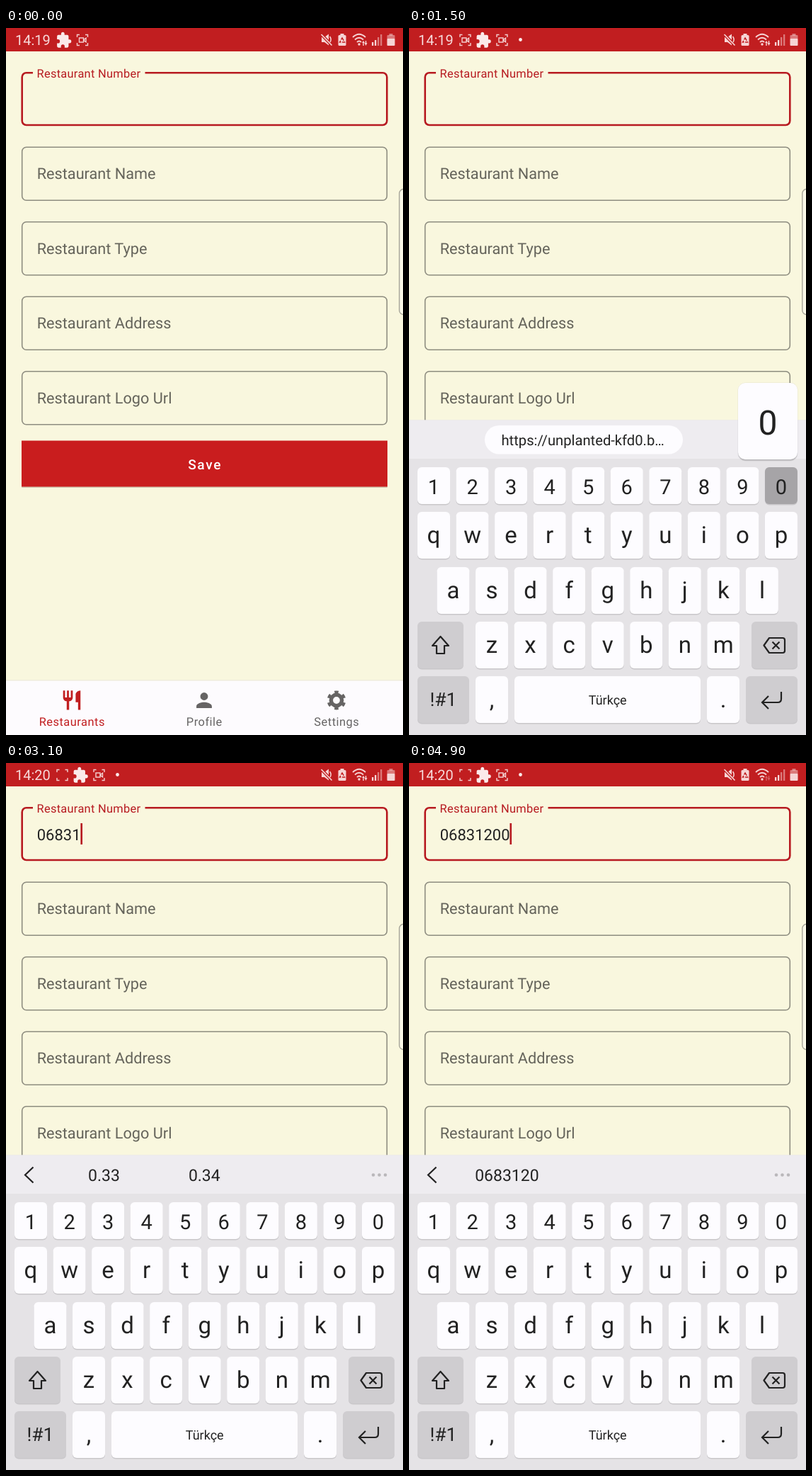
Animation, 561 px wide and 998 px high, one loop 5 s. Source, as an HTML page:

```html
<!DOCTYPE html>
<html lang="en">
<head>
<meta charset="utf-8">
<title>Restaurant form</title>
<style>
html, body { margin: 0; width: 100%; height: 100%; overflow: hidden; background: #f9f7de; }
svg { display: block; width: 100%; height: 100%; font-family: Roboto, Inter, sans-serif; text-rendering: geometricPrecision; }
.mid { text-anchor: middle; }
.line { fill: none; stroke: #222; stroke-width: 2.2; }
</style>
</head>
<body>
<svg id="stage" viewBox="0 0 561 998"></svg>
<script>
const LOOP = 5000;
const NUMBER = '06831200';
const RED = '#b71a20', PAPER = '#f9f7de', WHITE = '#fdfcff', GREY = '#cfcdd0', INK = '#222';
// key, down, up, key darkens
const PRESSES = [
  ['0', 1500, 1600, 1], ['6', 1900, 2000, 0], ['8', 2200, 2300, 0], ['3', 2600, 2800, 1],
  ['1', 3000, 3100, 1], ['2', 3300, 3400, 0], ['0', 4100, 4200, 1], ['0', 4800, 4900, 1]
];
const CARET_OFF = [[0, 500], [1000, 1600], [3900, 4200], [4800, 4900]];

const text = (x, y, size, fill, s, extra = '') =>
  `<text x="${x}" y="${y}" font-size="${size}" fill="${fill}" ${extra}>${s}</text>`;
const mid = (x, y, size, fill, s, extra = '') => text(x, y, size, fill, s, 'class="mid" ' + extra);
const rect = (x, y, w, h, fill, r = 0, extra = '') =>
  `<rect x="${x}" y="${y}" width="${w}" height="${h}" rx="${r}" fill="${fill}" ${extra}/>`;
const path = (d, extra = '') => `<path d="${d}" ${extra}/>`;
const group = (id, body, extra = '') => `<g id="${id}" ${extra}>${body}</g>`;

// status bar
const capture = (id, x) => group(id,
  path('M-7.5-4V-7.5H-4M4-7.5H7.5V-4M7.5 4V7.5H4M-4 7.5H-7.5V4') +
  `<g class="lens">${path('M-4.5-3H1.5V3H-4.5ZM1.5 0L5-2.8V2.8Z')}</g>`,
  `transform="translate(${x} 17)" fill="none" stroke="#f3cfcf" stroke-width="1.4"`);

const puzzle = path('M20.5 11H19V7c0-1.1-.9-2-2-2h-4V3.5a2.5 2.5 0 0 0-5 0V5H4a2 2 0 0 0-2 2v3.8h1.5a2.7 2.7 0 0 1 0 5.4H2V20a2 2 0 0 0 2 2h3.8v-1.5a2.7 2.7 0 0 1 5.4 0V22H17a2 2 0 0 0 2-2v-4h1.5a2.5 2.5 0 0 0 0-5Z',
  'transform="translate(70.2 4.6) scale(.96 1.05)" fill="#fbeaea"');

const status =
  rect(0, 0, 561, 33, '#c11e20') +
  text(13, 24, 20, '#f7d9d9', '14:19', 'id="clock"') +
  capture('newIcon', 79.5) + group('shifted', puzzle + capture('oldIcon', 108)) +
  '<circle id="dot" cx="157.5" cy="16.5" r="2.4" fill="#fbeaea"/>' +
  `<g fill="#f6d5d5">` +
    path('M446 13H450L456 8.5V24.5L450 20H446Z') +
    path('M445.5 9L460.5 24.5', 'stroke="#c11e20" stroke-width="4"') +
    path('M445.5 9L460.5 24.5', 'stroke="#f6d5d5" stroke-width="1.7"') +
    path('M457.500 12q3 4 .5 8', 'fill="none" stroke="#f6d5d5" stroke-width="1.5"') +
    rect(472.5, 8, 5, 3, '#f6d5d5') + rect(469.500, 10, 11, 15, '#f6d5d5', 1.5) +
    path('M475 14L478.500 20H471.5Z', 'fill="none" stroke="#c11e20" stroke-width="1.4" stroke-dasharray="4.5 1.5"') +
    path('M490 13Q499 4.500 508 13M493 16.5Q499 11 505 16.500M496 20Q499 17 502 20', 'fill="none" stroke="#f6d5d5" stroke-width="1.8"') +
    '<circle cx="499" cy="23" r="1.7"/>' +
    group('traffic', path('M503 21L505 18L507 21H505.700V25H504.3V21ZM506.500 21H507.800V18H509.2V21H510.500L508.500 25Z')) +
    [5, 8, 12, 16].map((h, i) => rect(517 + i * 4, 25 - h, 2.3, h, '#f6d5d5', 0, i > 1 ? 'opacity=".5"' : '')).join('') +
    rect(541.5, 8, 5, 3, '#f6d5d5', 0, 'opacity=".5"') + rect(538.5, 10, 11, 6, '#f6d5d5', 1, 'opacity=".5"') +
    rect(538.5, 15, 11, 10, '#f6d5d5', 1) +
  '</g>';

// form
const box = (y, h, color, width) =>
  rect(22.7, y, 515.6, h, 'none', 6, `stroke="${color}" stroke-width="${width}"`);
const fields = ['Name', 'Type', 'Address', 'Logo Url'].map((name, i) => {
  const y = 168.2 + i * 105.5;
  return box(y, 75, '#8e8d80', 1.6) + text(43.7, y + 45.2, 21.7, '#65645b', 'Restaurant ' + name);
}).join('');

const form =
  box(63.2, 73.8, RED, 2.6) + rect(38, 58, 158.5, 10, PAPER) +
  text(43.5, 69.7, 16.4, RED, 'Restaurant Number', 'letter-spacing=".3"') +
  text(43.7, 108.7, 22, INK, '', 'id="typed"') + rect(0, 85, 2.6, 30, RED, 0, 'id="caret"') +
  fields +
  rect(22, 584, 517, 65, '#b9ae99', 1, 'opacity=".6"') + rect(22, 582.5, 517, 65, '#c91d1e') +
  mid(281.2, 622.5, 19.1, '#fff', 'Save', 'font-weight="500" letter-spacing="1.7"') +
  rect(555.8, 227.500, 20, 177, '#faf9e8', 6, 'stroke="#a5a497" stroke-width="1.4"');

// bottom navigation
const gear =
  '<circle cx="12" cy="12" r="5.6" fill="none" stroke="#666464" stroke-width="4"/>' +
  '<circle cx="12" cy="12" r="8.2" fill="none" stroke="#666464" stroke-width="3.4" pathLength="12" stroke-dasharray=".9 1.1" transform="rotate(16.5 12 12)"/>';
const person = path('M12 12a4 4 0 1 0 0-8a4 4 0 0 0 0 8Zm0 2c-2.67 0-8 1.340-8 4v2h16v-2c0-2.660-5.330-4-8-4Z');
const cutlery = path('M11 9H9V2H7V9H5V2H3V9c0 2.120 1.660 3.840 3.750 3.970V22h2.500v-9.030C11.340 12.840 13 11.120 13 9V2H11Zm5-3v8h2.500v8H21V2c-2.760 0-5 2.240-5 4Z');
const tab = (x, icon, name, color) =>
  `<g fill="${color}" transform="translate(${x - 16.4} 932.6) scale(1.364)">${icon}</g>` +
  mid(x + .3, 984.7, 16.4, color, name, 'letter-spacing=".5"');
const nav = rect(0, 920, 561, 2, '#efecdc') + rect(0, 921.5, 561, 77, '#fdfbfe') +
  tab(93, cutlery, 'Restaurants', '#c11e20') + tab(280, person, 'Profile', '#666464') + tab(467, gear, 'Settings', '#666464');

// keyboard
const STEP = 54.55;
const key = (x, y, w, h, fill, extra = '') =>
  rect(x, y + 1.5, w, h, '#c9c7ca', 6) + rect(x, y, w, h, fill, 6, extra);
const row = (chars, x, y, h, size, base) => [...chars].map((c, i) => {
  const left = x + i * STEP;
  return key(left, y, 46, h, WHITE, `data-key="${c}"`) + mid(left + 23, y + base, size, INK, c);
}).join('');

const keys =
  row('1234567890', 12, 620, 52, 29, 38) + row('qwertyuiop', 12, 683, 66, 33, 44) +
  row('asdfghjkl', 39.5, 761, 66, 33, 44) + row('zxcvbnm', 94, 838, 66, 33, 44) +
  key(12, 838, 65, 66, GREY) + path('M44.500 859L56 872H50V883H39V872H33Z', 'class="line" stroke-linejoin="round"') +
  key(484, 838, 65, 66, GREY) +
  path('M509 861H528Q531 861 531 864V879Q531 882 528 882H509L501.500 871.500ZM513.500 866.500L523.500 876.500M523.500 866.500L513.500 876.500', 'class="line" stroke-linejoin="round"') +
  key(12, 915, 73, 66, GREY) + mid(48.5, 957, 26.5, INK, '!#1') +
  key(94, 915, 46, 66, WHITE) + mid(117, 959, 33, INK, ',') +
  key(149, 915, 263, 66, WHITE) + mid(280.7, 955, 18, INK, 'Türkçe') +
  key(421, 915, 46, 66, WHITE) + mid(444, 959, 33, INK, '.') +
  key(476, 915, 73, 66, GREY) + path('M526 937V947Q526 952 521 952H499M508 943L499 952L508 961', 'class="line"');

const bar =
  group('clip', rect(107, 561, 280, 40.5, WHITE, 20.2) +
    text(130.5, 588.5, 20.2, INK, 'https://unplanted-kfd0.b…') +
    path('M517.500 571.500L537.500 591.500M537.500 571.500L517.500 591.500', 'class="line" stroke-width="2"')) +
  group('tools', path('M38.500 570.500L27 581.500L38.500 592.500', 'class="line"') +
    [519, 527.5, 536].map(x => `<circle cx="${x}" cy="581.5" r="2.3" fill="#b9b7ba"/>`).join('')) +
  mid(138.4, 590, 23, INK, '', 'id="left"') + mid(280.3, 590, 23, INK, '', 'id="centre"') +
  text(175.5, 590, 20, '#77757a', '0', 'id="extra"');

const popup = group('popup',
  rect(-42.5, 500.5, 85, 111, '#000', 11, 'opacity=".07"') +
  rect(-42, 502, 84, 108.5, '#000', 10, 'opacity=".14"') + rect(-42, 501, 84, 108, WHITE, 10) +
  mid(0, 574, 48, INK, '', 'id="big"'));

stage.innerHTML = rect(0, 0, 561, 998, PAPER) + form + nav + status +
  group('keyboard', rect(0, 553.5, 561, 600, '#e5e3e6') + rect(0, 553.5, 561, 54.5, '#eeecf0') + bar + keys + popup);

const $ = id => document.getElementById(id);
const lens = document.querySelector('#newIcon .lens');
const digitKeys = [...document.querySelectorAll('[data-key]')].slice(0, 10);
const ramp = (t, from, to) => Math.min(1, Math.max(0, (t - from) / (to - from)));
const fade = (el, o) => el.setAttribute('opacity', o);
const write = (id, s) => { if ($(id).textContent !== s) $(id).textContent = s; };

function suggestions(t) {
  if (t < 2500) return ['', ''];
  if (t < 3100) return ['', '0.33'];
  if (t < 3700) return ['0.33', '0.34'];
  return [NUMBER.slice(0, t < 4800 ? 6 : 7), t < 3900 ? '0.34' : ''];
}

function draw(t) {
  const arrive = ramp(t, 100, 300);
  fade($('newIcon'), arrive);
  $('shifted').setAttribute('transform', `translate(${23.5 * arrive} 0)`);
  fade(lens, Math.floor(t / 487) % 2);
  fade($('dot'), t >= 1300 ? 1 : 0);
  fade($('traffic'), t >= 4900 ? .35 : 1);
  write('clock', t < 2400 ? '14:19' : '14:20');

  const count = PRESSES.filter(p => t >= p[2]).length;
  write('typed', NUMBER.slice(0, count));
  $('caret').setAttribute('x', 43.6 + count * 12.36);
  fade($('caret'), CARET_OFF.some(([a, b]) => t >= a && t < b) ? 0 : 1);

  const drop = 115 * (1 - ramp(t, 650, 1100)) ** 5;
  $('keyboard').setAttribute('transform', `translate(0 ${drop})`);
  fade($('keyboard'), t < 700 ? 0 : 1 - drop / 300);

  fade($('clip'), 1 - ramp(t, 1800, 2000));
  fade($('tools'), ramp(t, 1800, 2200));
  const [left, centre] = suggestions(t);
  write('left', left);
  write('centre', centre);
  fade($('centre'), 1 - ramp(t, 3600, 3900));
  $('left').setAttribute('x', t >= 4400 && t < 4800 ? 136.8 : 138.4);
  fade($('extra'), t < 4800 ? ramp(t, 4350, 4500) : 0);

  const press = PRESSES.find(p => t >= p[1] && t < p[2]);
  fade($('popup'), press ? 1 : 0);
  for (const k of digitKeys)
    k.setAttribute('fill', press && press[3] && k.dataset.key === press[0] ? '#a6a4a7' : WHITE);
  if (press) {
    const x = 35 + '1234567890'.indexOf(press[0]) * STEP;
    $('popup').setAttribute('transform', `translate(${Math.min(507, Math.max(54, x))} 0)`);
    write('big', press[0]);
  }
}

function tick() {
  draw(performance.now() % LOOP);
  requestAnimationFrame(tick);
}
tick();
</script>
</body>
</html>
```
